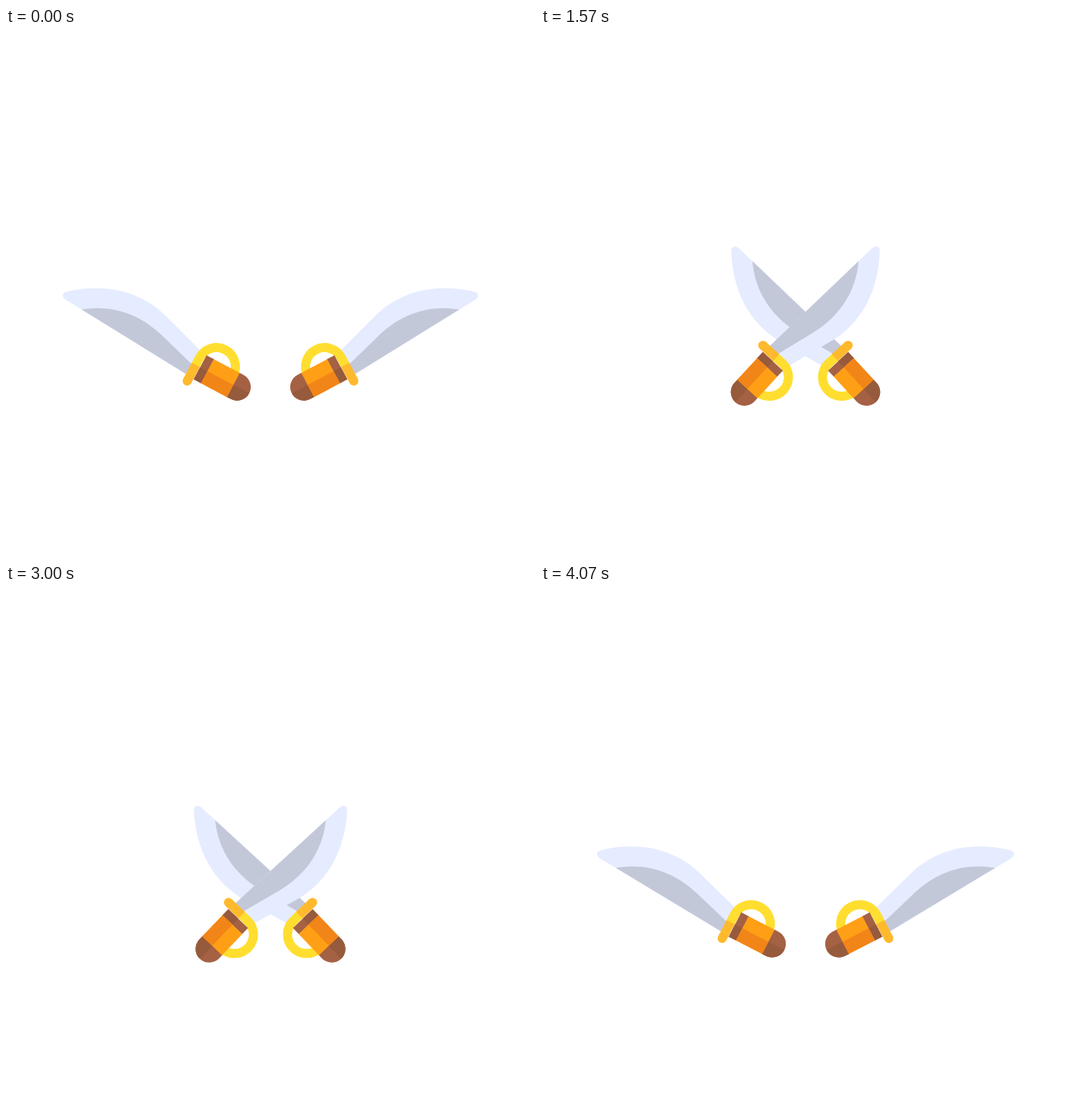
An HTML page with a canvas that plays this animation: 640 by 640 pixels, repeating every 4.14 s.

```html
<!DOCTYPE html>
<html lang="en">
<head>
<meta charset="utf-8">
<title>Crossing sabres</title>
<style>
  html, body { margin: 0; width: 100%; height: 100%; overflow: hidden; background: #fff; }
  canvas { display: block; width: 100%; height: 100%; }
</style>
</head>
<body>
<canvas id="stage" width="640" height="640"></canvas>
<script>
const ctx = document.getElementById('stage').getContext('2d');
const LOOP = 4140, FPS = 14;
const PIVOT = { x: 260.5, y: 424.5 };
const HILT = { x: 260, y: 425 };
const REST = 105.2, FAR = 120, OPEN = -0.6;

const clamp = v => Math.min(1, Math.max(0, v));
const lerp = (a, b, k) => a + (b - a) * k;
const smooth = u => u * u * (3 - 2 * u);
const part = (t, from, to) => clamp((t - from) / (to - from));

// Ease with flat ends; x1 and x2 set how long each end lingers.
function ease(u, x1, x2) {
  let lo = 0, hi = 1, s = 0.5;
  for (let i = 0; i < 30; i++) {
    s = (lo + hi) / 2;
    const r = 1 - s;
    const x = 3 * r * r * s * x1 + 3 * r * s * s * x2 + s * s * s;
    if (x < u) lo = s; else hi = s;
  }
  return smooth(s);
}

// Swing: strike, slide wide, settle, rest, then the way back.
function swing(t) {
  if (t < 284) return Math.min(REST, 0.6 * Math.exp(t / 54.9));
  if (t < 745) return lerp(REST, FAR, ease(part(t, 284, 745), 0.22, 0.67));
  if (t < 1135) return lerp(FAR, REST, smooth(part(t, 745, 1135)));
  if (t < 2935) return REST;
  if (t < 3325) return lerp(REST, FAR, smooth(part(t, 2935, 3325)));
  if (t < 3775) return lerp(FAR, REST, ease(part(t, 3325, 3775), 0.33, 0.78));
  return REST * Math.pow(1 - part(t, 3775, 4070), 4.4);
}

function fill(color, path) {
  ctx.fillStyle = color;
  ctx.fill(path);
}

const blade = new Path2D(
  'M222 421.2 L71.8 328.4 Q68.6 326.2 68.8 323.4 Q69 320 73 319 ' +
  'C130 306 170 325 193 348 L238 393 Z');
const shade = new Path2D('M91.5 340.6 C130 334 165 347 193 376 L227 409 L222 421.2 Z');

function box(x, y, w, h, color) {
  ctx.fillStyle = color;
  ctx.fillRect(x, y, w, h);
}

function guard() {
  ctx.lineWidth = 11;
  ctx.lineCap = 'butt';
  ctx.strokeStyle = '#ffde2f';
  ctx.beginPath();
  ctx.moveTo(-35, 0);
  ctx.lineTo(-35, -11);
  ctx.arc(-12, -11, 23, Math.PI, 0);
  ctx.lineTo(11, -6);
  ctx.stroke();
  ctx.strokeStyle = ctx.fillStyle = '#ffb92d';
  ctx.beginPath();
  ctx.moveTo(-35, -1);
  ctx.lineTo(-35, 21);
  ctx.stroke();
  ctx.beginPath();
  ctx.arc(-35, 21, 5.5, 0, Math.PI * 2);
  ctx.fill();
}

function grip() {
  box(-29, -17.5, 10.5, 33, '#a46143');
  box(-29, -1, 10.5, 16.5, '#965a3c');
  const pommel = new Path2D('M16 -17.5 H21.7 A16.5 16.5 0 0 1 21.7 15.5 H16 Z');
  const under = new Path2D('M16 -1 H38.2 A16.5 16.5 0 0 1 21.7 15.5 H16 Z');
  fill('#a46143', pommel);
  fill('#965a3c', under);
  box(-19, -17.5, 35.5, 33, '#ff9f16');
  box(-19, -1, 35.5, 16.5, '#f28518');
}

function turn(angle) {
  ctx.translate(PIVOT.x, PIVOT.y);
  ctx.rotate(angle);
  ctx.translate(-PIVOT.x, -PIVOT.y);
}

function glint(t, angle) {
  if (t < 1520 || t > 2330) return;
  const x = lerp(272, 432, smooth(part(t, 1520, 2330)));
  const y = 293 - 0.93 * (x - 373);
  ctx.save();
  ctx.clip(blade);
  turn(-angle);
  ctx.beginPath();
  ctx.moveTo(x - 33, y - 174);
  ctx.lineTo(x + 33, y + 174);
  ctx.lineTo(x + 7, y + 198);
  ctx.lineTo(x - 59, y - 150);
  ctx.closePath();
  ctx.fillStyle = 'rgba(255,255,255,0.8)';
  ctx.fill();
  ctx.restore();
}

function sword(t, mirrored) {
  const angle = (swing(t) + OPEN) * Math.PI / 180;
  ctx.save();
  if (mirrored) {
    ctx.translate(640, 0);
    ctx.scale(-1, 1);
  }
  turn(angle);
  fill('#e6ecff', blade);
  fill('#c3c8d9', shade);
  glint(t, angle);
  ctx.translate(HILT.x, HILT.y);
  ctx.rotate(28 * Math.PI / 180);
  guard();
  grip();
  ctx.restore();
}

// Each spark runs along a ray from below the crossing point.
const sparks = [
  { tilt: 0, from: 113, to: 166, start: 245, time: 150 },
  { tilt: 0, from: 74, to: 126, start: 280, time: 210 },
  { tilt: -28.5, from: 103, to: 153, start: 280, time: 210 },
  { tilt: 28.5, from: 97, to: 147, start: 280, time: 210 }
];

function drawSpark(s, t) {
  const p = (t - s.start) / s.time;
  if (p <= 0 || p >= 1) return;
  const head = lerp(s.from, s.to, 1 - (1 - p) * (1 - p));
  const tail = lerp(s.from, s.to, p * p);
  ctx.save();
  ctx.translate(321.6, 397);
  ctx.rotate(s.tilt * Math.PI / 180);
  ctx.beginPath();
  ctx.roundRect(-3, -head, 6, head - tail, 2);
  ctx.fillStyle = '#ffa808';
  ctx.fill();
  ctx.restore();
}

function draw(t) {
  ctx.fillStyle = '#fff';
  ctx.fillRect(0, 0, 640, 640);
  sparks.forEach(s => drawSpark(s, t));
  sword(t, true);
  sword(t, false);
}

function tick() {
  const t = performance.now() % LOOP;
  // Steps of 1/14 s, switched on the nearest 10 ms.
  const step = Math.floor((Math.floor(t / 10) * 10 + 5) * FPS / 1000);
  draw(Math.min(step, 57) * 1000 / FPS);
  requestAnimationFrame(tick);
}
tick();
</script>
</body>
</html>
```
